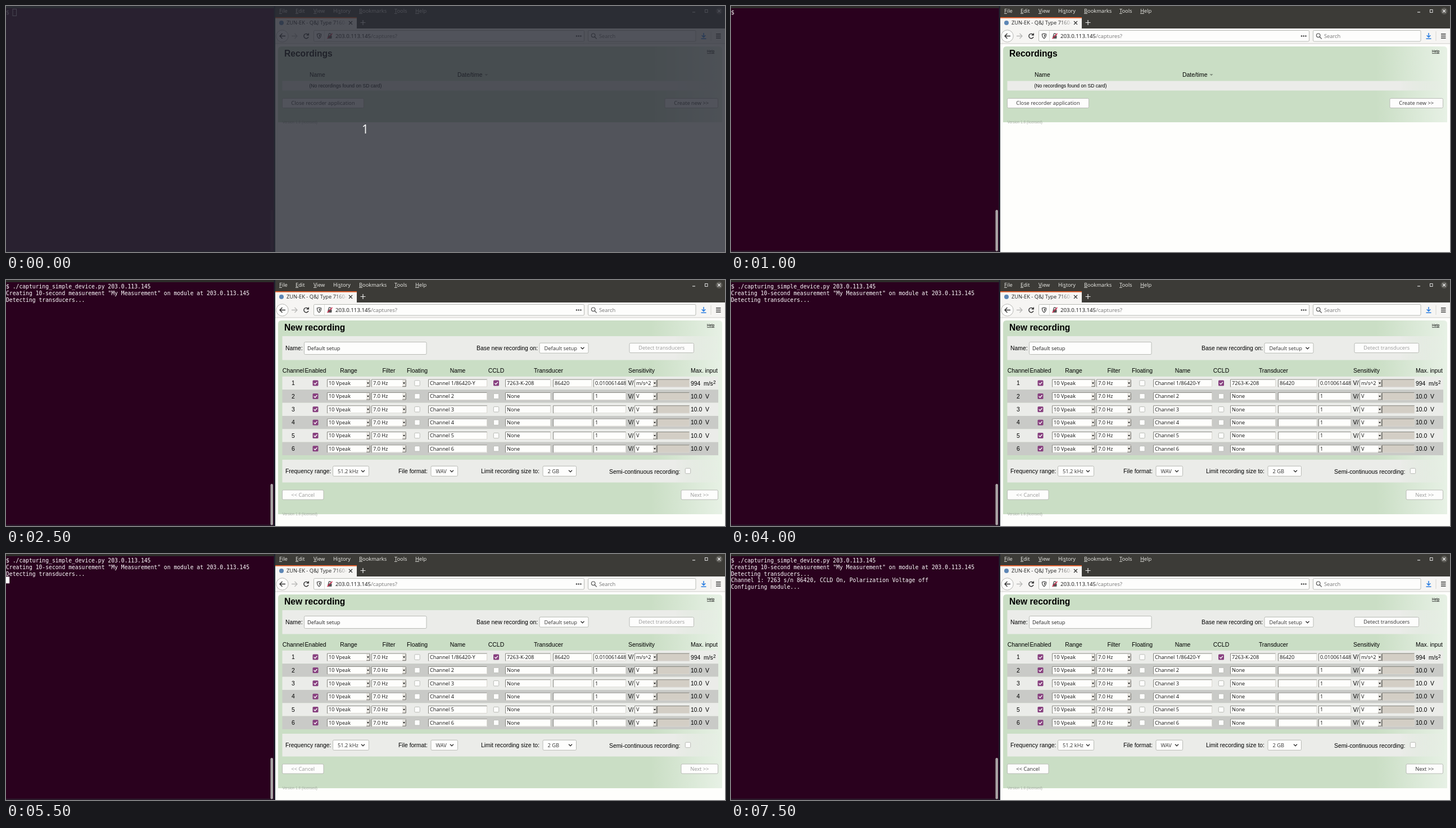
Write an HTML page that moves like this. It is 1279 px wide and 438 px high and loops after 8000 ms.

```html
<!DOCTYPE html>
<html lang="en">
<head>
<meta charset="utf-8">
<title>Recorder session</title>
<style>
html, body { margin: 0; width: 100%; height: 100%; overflow: hidden; background: #fefefc; }
svg { display: block; width: 1279px; height: 438px; }
text { font-family: "Liberation Sans", Arial, sans-serif; white-space: pre; }
.ui { font-family: "Open Sans", "Noto Sans", sans-serif; }
.mono { font-family: "DejaVu Sans Mono", monospace; font-size: 9.72px; fill: #fff; }
.key { text-decoration: underline; }
.late { fill: #999; }
.ready .late { fill: #333; }
</style>
</head>
<body>
<svg id="stage" viewBox="0 0 1279 438"></svg>
<script>
const stage = document.getElementById('stage');
const LOOP = 8000, CELL = 5.851, LINE = 11.7;
const HOST = '203.0.113.145';
const BAR = '#ebece9', EDGE = '#b9bbb6', INK = '#333';

// Drawing helpers; text is placed by the middle of its capitals.
const rect = (x, y, w, h, fill, more = '') =>
  `<rect x="${x}" y="${y}" width="${w}" height="${h}" fill="${fill}" ${more}/>`;
const path = (d, stroke, width = 1, fill = 'none') =>
  `<path d="${d}" stroke="${stroke}" stroke-width="${width}" fill="${fill}"/>`;
const circle = (x, y, r, fill, more = '') =>
  `<circle cx="${x}" cy="${y}" r="${r}" fill="${fill}" ${more}/>`;
const text = (x, y, s, size = 10.4, more = '') =>
  `<text x="${x}" y="${y + size * .36}" font-size="${size}" ${more}>${s}</text>`;
const mid = (x, y, s, size, more = '') => text(x, y, s, size, 'text-anchor="middle" ' + more);
const ui = (x, y, s, fill = INK, size = 9.3, more = '') =>
  text(x, y, s, size, `class="ui" fill="${fill}" ${more}`);
const group = (id, ...parts) => `<g id="${id}">${parts.join('')}</g>`;

const frame = (x, y, w, h, fill = '#fdfdfc') =>
  rect(x + .5, y + .5, w - 1, h - 1, fill, `rx="2" stroke="${EDGE}"`);
const button = (x, y, w, label, kind = '') =>
  frame(x, y, w, 18) + mid(x + w / 2, y + 9, label, 9.3, `class="ui ${kind}" fill="${INK}"`);
const chevron = (x, y) => path(`M${x - 3} ${y - 1.5}l3 3 3-3`, INK, 1.4);
const select = (x, y, w, label, h = 19) =>
  frame(x, y - h / 2, w, h) + ui(x + 9, y, label) + chevron(x + w - 11, y);
const check = (x, y, on) => on
  ? rect(x - 5, y - 5, 10, 10, '#87407f', 'rx="1.5"') + path(`M${x - 2.7} ${y}l2 2.2 3.6-4.2`, '#fff', 1.4)
  : rect(x - 4.7, y - 4.7, 9.4, 9.4, '#fdfdfc', `rx="1.5" stroke="${EDGE}"`);
const field = (x, y, w, label = '', fill = '#fefefc') =>
  rect(x, y - 7, w, 14, fill) +
  path(`M${x + .5} ${y + 7}v-13.5h${w - .5}`, '#85857f') +
  path(`M${x + 1} ${y + 6.5}h${w - 1.5}v-13`, '#d8d6d0') +
  ui(x + 3, y, label, '#111', 9.2);
const drop = (x, y, w, label) => field(x, y, w, label) +
  rect(x + w - 7, y - 5.5, 6, 11.5, '#e9e7e2') +
  path(`M${x + w - .8} ${y - 5.5}v11.5h-6`, '#66645f') +
  path(`M${x + w - 6} ${y - 1}h4l-2 2.6z`, 'none', 0, '#111');

const panel = (h, title) =>
  path(`M484 ${72 + h}V78q0-6 6-6H1268q6 0 6 6V${72 + h}z`, 'none', 0, 'url(#green)') +
  text(495, 84.4, title, 15.6, 'font-weight="bold"') +
  text(1247, 81, 'Help', 6.5, 'class="key"') +
  text(491.5, 123 + h - 12 - 51 + 12 + 0, 'Version 1.6 (licensed)', 6.5, 'fill="#a3aca1"');

function terminal() {
  const lines = [
    `Creating 10-second measurement "My Measurement" on module at ${HOST}`,
    'Detecting transducers...',
    'Channel 1: 7263 s/n 86420, CCLD On, Polarization Voltage off',
    'Configuring module...'
  ];
  const row = (n, s, x = 0, id = '') =>
    `<text class="mono" x="${x}" y="${15.2 + n * LINE}" ${id && `id="${id}"`}>${s}</text>`;
  return rect(0, 0, 478, 438, '#320125', 'id="term"') +
    rect(0, 0, 478, 4, '#3c3b37', 'id="strip"') +
    rect(0, 435.5, 478, 2.5, '#2b1a2a') + rect(476.5, 0, 2.5, 438, '#20232e') +
    rect(470.5, 363, 4.5, 73.5, '#3f1233', 'id="thumb" rx="2.2"') +
    row(0, '$', 0, 'prompt') +
    row(0, './capturing_simple_device.py ' + HOST, 2 * CELL, 'command') +
    group('early', row(1, lines[0]), row(2, lines[1])) +
    group('final', row(3, lines[2]), row(4, lines[3])) +
    rect(12, 5.5, 6.5, 12, 'none', 'id="hollow" stroke="#c5b8c2"') +
    rect(0, 0, 6.2, 12, '#fff', 'id="cursor"');
}

function chrome() {
  const menu = [[486, '', 'F', 'ile'], [515, '', 'E', 'dit'], [547, '', 'V', 'iew'], [582, 'Hi', 's', 'tory'],
    [628, '', 'B', 'ookmarks'], [691, '', 'T', 'ools'], [728, '', 'H', 'elp']];
  return rect(479, 0, 800, 40, '#3c3b37') +
    menu.map(([x, a, key, b]) => ui(x, 8.5, `${a}<tspan class="key">${key}</tspan>${b}`, '#eeeeea')).join('') +
    path('M1221 11h5', '#ddd', 1.2) + rect(1243.5, 6.5, 4.5, 5, 'none', 'stroke="#ddd"') +
    circle(1268.5, 9, 6, '#5d5c57') + path('M1266 6.5l5 5m0-5l-5 5', '#eee', 1.2) +
    rect(479, 20, 145, 20, '#f6f5f3') + rect(479, 20, 145, 1.8, '#e8602c') +
    circle(490, 30, 4, '#5d86b5') +
    ui(499, 30, 'ZUN-EK - Q&amp;J Type 7160-', '#222') +
    rect(584, 22, 23, 18, 'url(#fade)') + rect(606.5, 22, 17.5, 18, '#f6f5f3') +
    path('M610 27l6 6m0-6l-6 6', INK, 1.2) + path('M630.5 29.5h9m-4.5-4.5v9', '#eee', 1.2) +
    rect(479, 40, 800, 27, '#f6f5f3') + rect(479, 66.5, 800, 1, '#cfcecb') +
    circle(491.5, 53.5, 10.7, '#fdfdfc', 'stroke="#b5b5b2"') +
    path('M497 53.5h-10m4.5-4.5l-4.5 4.5 4.5 4.5', INK, 1.4) +
    path('M508 53.5h10m-4.5-4.5l4.5 4.5-4.5 4.5', '#b9b9b7', 1.3) +
    path('M537.4 51a4.2 4.2 0 1 0 .6 4M538.3 48.5v3.3h-3.5', INK, 1.4) +
    frame(547, 43, 482, 20.5) + frame(1035, 43, 192.5, 20.5) +
    rect(566, 44, 1, 18.5, '#dededb') +
    path('M557 49q2 1 3.6 1 0 6-3.6 7.8-3.6-1.8-3.6-7.8 1.6 0 3.6-1z', INK, 1.1) +
    path('M557 51v5q1.7-1.4 1.8-4.4z', 'none', 0, INK) +
    rect(572.5, 52.5, 7, 5.5, '#555', 'rx="1"') + path('M574 53v-2a2 2 0 0 1 4 0v2', '#555', 1.3) +
    path('M571.5 58l9-9', '#d7264c', 1.4) +
    ui(586, 53.7, `${HOST}<tspan fill="#777">/captures?</tspan>`, '#111', 9.7) +
    [1015, 1018.7, 1022.4].map(x => circle(x, 53.5, 1.3, '#444')).join('') +
    circle(1044.7, 52.3, 3.3, 'none', 'stroke="#555" stroke-width="1.2"') + path('M1047 54.8l3.8 3.8', '#555', 1.3) +
    ui(1055, 53.7, 'Search', '#757575') +
    path('M1241 48v7.5m-3.3-3.2l3.3 3.3 3.3-3.3M1236.5 58.3h9', '#2a7de1', 1.5) +
    rect(1253.5, 45, 1, 17, '#d6d5d2') +
    path('M1263 50h8.5m-8.5 3.5h8.5m-8.5 3.5h8.5', INK, 1.3);
}

function listPage() {
  return panel(135, 'Recordings') +
    text(540, 122.5, 'Name') + text(803, 122.5, 'Date/time') +
    path('M851.5 121.3h6l-3 3z', 'none', 0, '#7d8a7a') +
    rect(491.5, 133.5, 775, 17, 'url(#bar)') +
    text(539.5, 142, '(No recordings found on SD card)', 8.65) +
    button(491, 164, 146, 'Close recorder application') +
    button(1171.5, 164, 95.5, 'Create new &gt;&gt;');
}

function channelRow(_, i) {
  const y = 183.6 + i * 23.35, first = i === 0;
  return rect(491.5, y - 11.7, 775.5, 23.4, i % 2 ? '#c9cac7' : BAR) +
    mid(511, y, i + 1, 10.4) + check(550.5, y, true) +
    drop(571, y, 77, '10 Vpeak') + drop(650, y, 62, '7.0 Hz') + check(731.5, y, false) +
    field(751, y, 105, first ? 'Channel 1/86420-Y' : 'Channel ' + (i + 1)) + check(872, y, first) +
    field(888, y, 81, first ? '7263-K-208' : 'None') +
    field(973, y, 69.5, first ? '86420' : '') + field(1045, y, 58, first ? '0.010061448' : '1') +
    text(1106.5, y, 'V/') + drop(1118, y, 40, first ? 'm/s^2' : 'V') +
    field(1158, y, 58, '', '#d3cec5') +
    (first
      ? text(1218, y + 1, '994') + text(1241, y + 1, 'm/s') + text(1258, y - 2, '2', 8.4)
      : text(1218, y, '10.0') + text(1244, y, 'V'));
}

function formPage() {
  const heads = [[511, 'Channel'], [550.5, 'Enabled'], [609.5, 'Range'], [681, 'Filter'], [731.5, 'Floating'],
    [803.5, 'Name'], [872, 'CCLD'], [965, 'Transducer'], [1130.5, 'Sensitivity'], [1242, 'Max. input']];
  return panel(345, 'New recording') +
    rect(491.5, 100, 775, 42.5, 'url(#bar)') +
    text(497, 121.3, 'Name:') + frame(530, 110, 218.5, 23) + ui(536, 121.5, 'Default setup', '#222') +
    text(837, 121.3, 'Base new recording on:') + select(948.5, 121.2, 88, 'Default setup') +
    button(1108.5, 112, 115.5, 'Detect transducers', 'late') +
    heads.map(([x, s]) => mid(x, 161.3, s, 10.4)).join('') +
    Array.from({ length: 6 }, channelRow).join('') +
    rect(491.5, 320, 775, 40.5, 'url(#bar)') +
    text(497, 340.3, 'Frequency range:') + select(581, 340.3, 65, '51.2 kHz') +
    text(698, 340.3, 'File format:') + select(755.5, 340.3, 48.5, 'WAV') +
    text(845, 340.3, 'Limit recording size to:') + select(954.5, 340.3, 60.5, '2 GB') +
    text(1073, 341.5, 'Semi-continuous recording:') + check(1213, 340, false) +
    button(491, 373.5, 74.5, '&lt;&lt; Cancel', 'late') +
    button(1200.5, 373.5, 66.5, 'Next &gt;&gt;', 'late');
}

const gradient = (id, ...stops) => `<linearGradient id="${id}">` + stops.map(([at, color, alpha = 1]) =>
  `<stop offset="${at}" stop-color="${color}" stop-opacity="${alpha}"/>`).join('') + '</linearGradient>';

stage.innerHTML = '<defs>' +
  gradient('green', [0, '#cadec5'], [.84, '#cadec5'], [1, '#e7f1e5']) +
  gradient('bar', [0, BAR], [.9, BAR], [1, BAR, .2]) +
  gradient('fade', [0, '#f6f5f3', 0], [1, '#f6f5f3', .9]) + '</defs>' +
  rect(0, 0, 1279, 438, '#fefefc') + terminal() + chrome() +
  group('list', listPage()) + group('form', formPage()) +
  group('dim', rect(0, 0, 1279, 438, '#272a34', 'opacity=".8"'),
    mid(639, 219.3, '1', 21, 'class="ui" fill="#fff"'));

const part = Object.fromEntries([...stage.querySelectorAll('[id]')].map(e => [e.id, e]));
const show = (id, on) => part[id].setAttribute('visibility', on ? 'visible' : 'hidden');
const paint = (id, fill) => part[id].setAttribute('fill', fill);

// Cursor changes: start time, then column and line; no position means blinked off.
const cursorSteps = [[0], [1500, 44, 0], [2000, 0, 1], [2500], [3000, 0, 3], [4000], [4500, 0, 3],
  [5000], [5500, 0, 3], [6500, 0, 5], [7500]];

function draw() {
  const t = performance.now() % LOOP;
  const focused = t >= 1000, form = t >= 2500, ready = t >= 6500;
  show('dim', t < 500);
  show('hollow', !focused);
  paint('term', focused ? '#2a011e' : '#320125');
  paint('strip', focused ? '#2d2c29' : '#3c3b37');
  paint('thumb', focused ? '#aaa5a6' : '#3f1233');
  part.prompt.style.fill = focused ? '#fff' : '#d0c4cd';
  show('command', t >= 1500);
  show('early', form);
  show('final', ready);
  show('list', !form);
  show('form', form);
  stage.classList.toggle('ready', ready);

  const [, col, line] = cursorSteps.findLast(([start]) => t >= start);
  show('cursor', line !== undefined);
  if (line !== undefined) {
    part.cursor.setAttribute('x', col * CELL);
    part.cursor.setAttribute('y', 5.2 + line * LINE);
  }
  requestAnimationFrame(draw);
}
draw();
</script>
</body>
</html>
```
